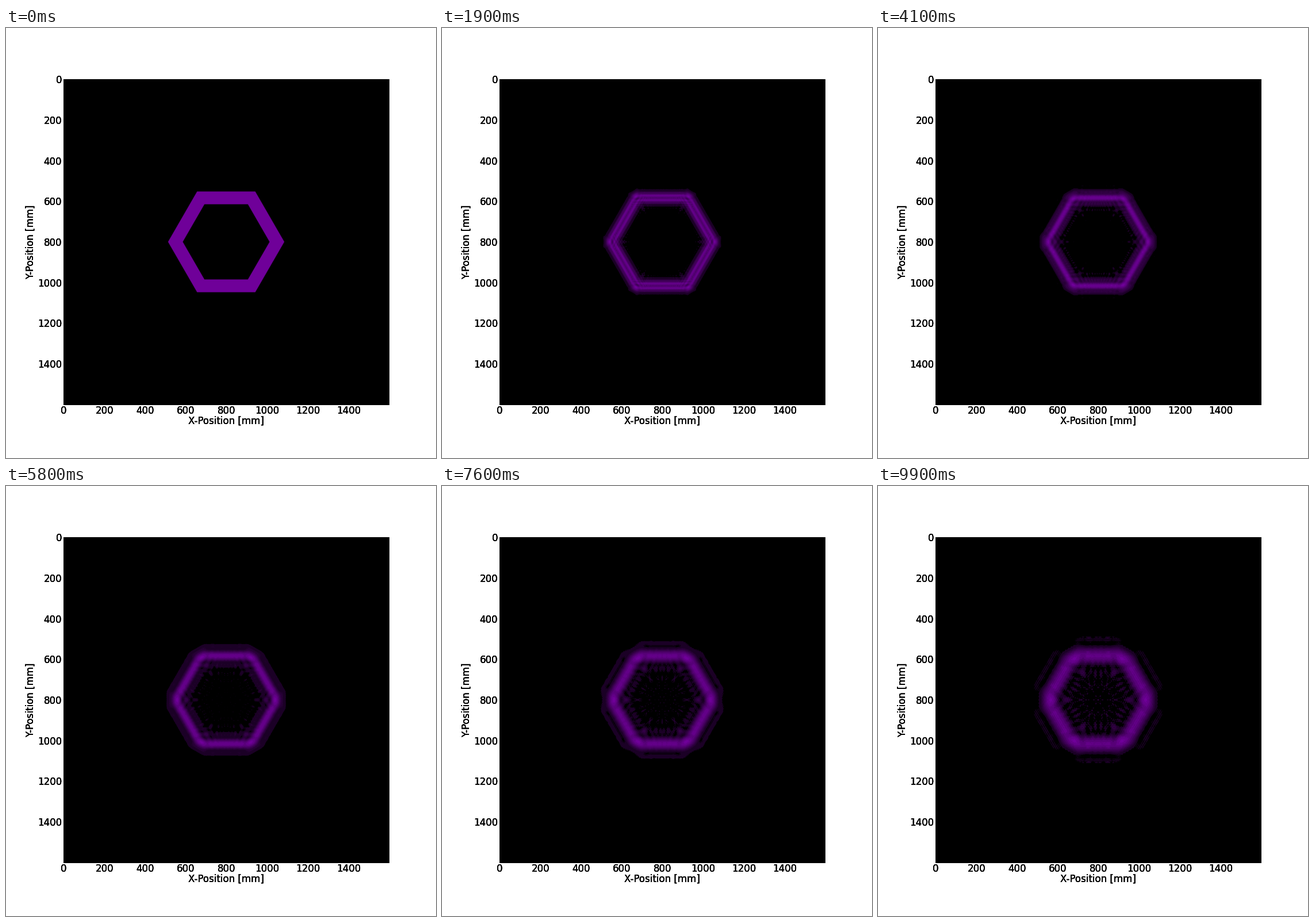
A matplotlib script that plays this animation: 748x748 px, repeating every 10 s.

```python
import numpy as np
import matplotlib.pyplot as plt
from matplotlib.animation import FuncAnimation
from matplotlib.patches import Rectangle

SIZE, DPI = 748, 100
FRAMES, INTERVAL = 100, 100
CX, CY, HALF = 383.5, 372, 283       # plot centre and half width in pixels
OUTER, INNER = 101.2, 75.5           # hexagon corner radii
STEP = 4.75                          # wavelength * distance gained per frame
H, N, VIEW = 0.5, 800, 125           # grid spacing, grid size, half width shown
REACH = 200                          # farthest spread kept, avoids wrap-around
PURPLE = np.array([111, 0, 153]) / 255

plt.rcParams["font.family"] = "DejaVu Sans"
plt.rcParams["font.size"] = 12

# Hexagonal ring aperture and its spectrum
axis = (np.arange(N) - N / 2 + 0.5) * H
x, y = np.meshgrid(axis, axis)


def hexagon(radius):
    apothem = radius * np.sqrt(3) / 2
    dist = np.maximum(abs(y), abs(x) * np.sqrt(3) / 2 + abs(y) / 2)
    return np.clip((apothem - dist) / H + 0.5, 0, 1)


aperture = hexagon(OUTER) - hexagon(INNER)
spectrum = np.fft.fft2(aperture)
freq = np.fft.fftfreq(N, H)
crop = slice(N // 2 - int(VIEW / H), N // 2 + int(VIEW / H))


def intensity(lz):
    """Fresnel diffraction pattern, scaled to its brightest point."""
    if lz == 0:
        return aperture[crop, crop] ** 2
    k = np.exp(-1j * np.pi * lz * freq ** 2) * (abs(freq) * lz < REACH)
    rows = np.fft.ifft(spectrum * k[:, None], axis=0)[crop]
    field = np.fft.ifft(rows * k, axis=1)[:, crop]
    power = field.real ** 2 + field.imag ** 2
    return power / power.max()


def srgb(v):
    return np.where(v < 0.0031308, 12.92 * v, 1.055 * v ** (1 / 2.4) - 0.055)


def shade(power):
    """Purple in a few flat tones, black where too dim."""
    red = PURPLE[0]
    linear = ((red + 0.055) / 1.055) ** 2.4
    s = np.clip(srgb(power * linear) / red, 0, 1)
    low, step = 0.25, 0.75 / 7
    tone = low + np.round(np.maximum(s - low, 0) / step) * step
    tone = np.where(s < 0.17, 0, tone)
    return tone[..., None] * PURPLE


fig = plt.figure(figsize=(SIZE / DPI, SIZE / DPI), dpi=DPI, facecolor="white")
ax = fig.add_axes([0, 0, 1, 1])
ax.axis("off")

image = ax.imshow(shade(intensity(0)), zorder=2,
                  extent=(CX - VIEW, CX + VIEW, CY + VIEW, CY - VIEW))
ax.set_aspect("auto")
ax.set_xlim(0, SIZE)
ax.set_ylim(SIZE, 0)

left, top = CX - HALF, CY - HALF
ax.add_patch(Rectangle((left - 0.5, top), 2 * HALF + 1, 2 * HALF + 1,
                       color="black", lw=0, zorder=1))


def labels():
    for value in range(0, 1600, 200):
        offset = value / 1600 * 2 * HALF
        ax.text(left + offset, 671, str(value), ha="center", va="baseline")
        ax.text(97, top + offset, str(value), ha="right",
                va="center_baseline")
    ax.text(CX - 0.5, 689, "X-Position [mm]", ha="center", va="baseline")
    ax.text(48, CY, "Y-Position [mm]", ha="center", va="baseline",
            rotation=90, rotation_mode="anchor")


# Overprinting gives the text its heavier weight
for _ in range(4):
    labels()


def update(i):
    image.set_data(shade(intensity(i * STEP)))
    return [image]


anim = FuncAnimation(fig, update, frames=FRAMES, interval=INTERVAL,
                     repeat=True, repeat_delay=0)
plt.show()
```
